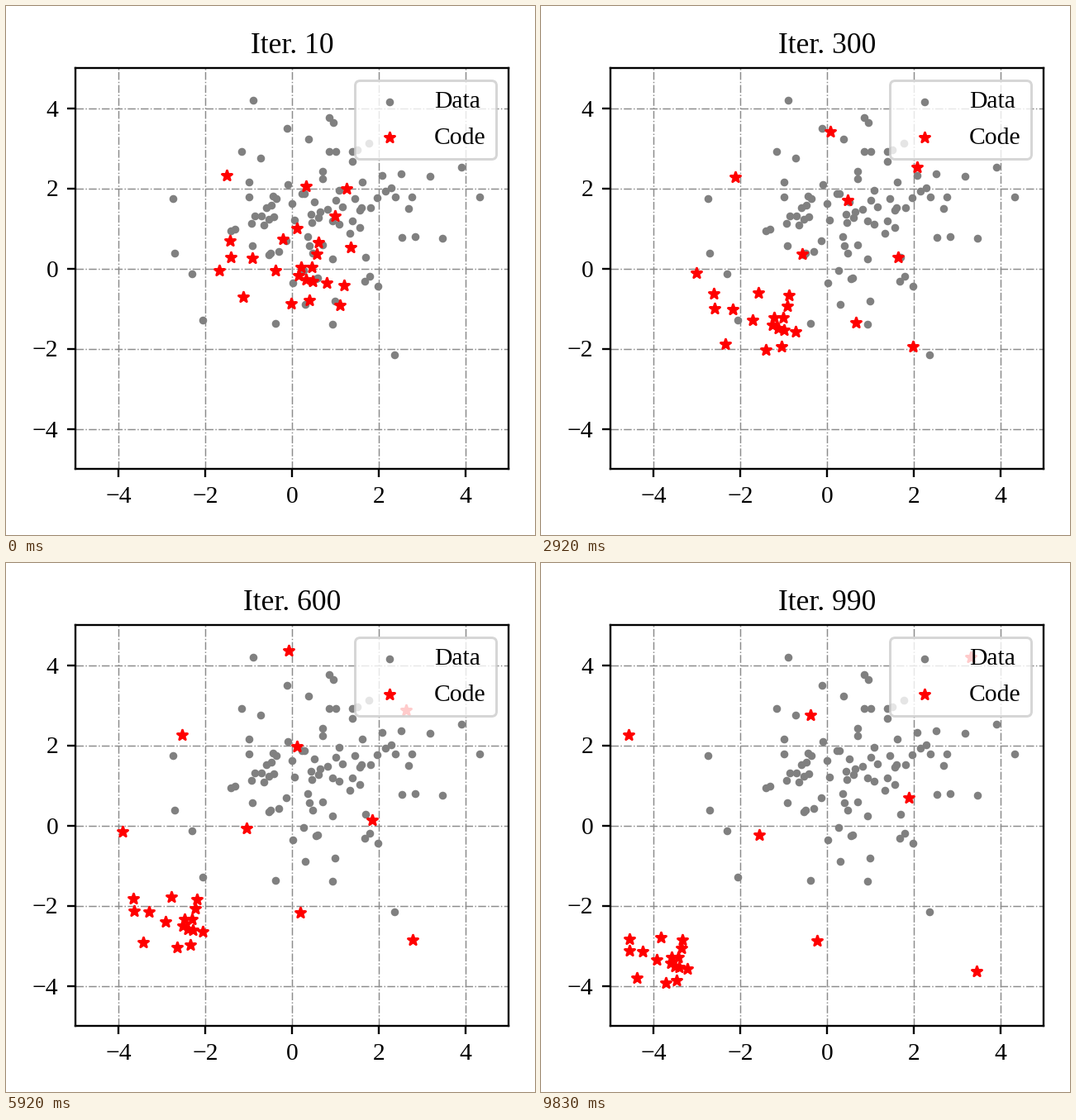
Recreate the animation shown at these times as a matplotlib script. Size 640 by 640 pixels, loop 9990 ms.

```python
import numpy as np
import matplotlib.pyplot as plt
from matplotlib.animation import FuncAnimation

LOOP_MS = 9990
SLOTS = 120          # equal time slots in one loop
STEPS = 99           # distinct iterations shown
TURN = 74            # step at which the wanderers change course

# Axes box on the stage, in pixels from the top left
LEFT, RIGHT, TOP, BOTTOM = 84, 608, 75, 560


def to_data(px):
    """Stage pixels to axes units (-5..5 both ways)."""
    corner, size = np.array([LEFT, BOTTOM]), np.array([RIGHT - LEFT, TOP - BOTTOM])
    return (px - corner) / size * 10 - 5


def ease_out(u, power):
    return 1 - (1 - u) ** power


def cloud(count, center, spread, reach):
    """Seeded normal scatter, cut off at a radius of `reach` deviations."""
    z = np.random.default_rng(8).normal(size=(4 * count, 2))
    z = z[np.hypot(z[:, 0], z[:, 1]) < reach][:count]
    return center + z * spread


# Data: a dense cloud and the dots around its rim
rim = np.array([
    (299, 114), (391, 135), (340, 148), (513, 206), (551, 195), (573, 231), (528, 281),
    (202, 233), (204, 299), (225, 324), (238, 380), (326, 384), (395, 385), (470, 422),
])
dots = to_data(np.vstack([rim, cloud(80, (380, 250), (63, 55), 2.1)]))

# Wanderers: start, turning point, end
wander = np.array([
    [(267, 205), (208, 208), (106, 208)],
    [(363, 218), (340, 97), (356, 38)],
    [(412, 221), (490, 174), (520, 114)],
    [(398, 254), (348, 219), (326, 184)],
    [(417, 292), (445, 313), (445, 284)],
    [(352, 269), (286, 325), (264, 329)],
    [(258, 320), (131, 325), (70, 351)],
])

# Swarm: start points; each ends at the same offset, drawn closer together
swarm = np.array([
    (271, 284), (335, 282), (272, 304), (298, 305), (378, 286), (287, 352),
    (376, 300), (326, 320), (357, 316), (370, 316), (354, 326), (363, 331),
    (371, 333), (388, 335), (345, 360), (367, 356),
])
swarm_end = (150, 480) + (swarm - (343, 320)) * (0.6, 0.7)

# Two stars leave the swarm for the lower right
start = np.vstack([swarm, [(404, 362), (409, 338)]])
end = np.vstack([swarm_end, [(527, 494), (334, 457)]])


def places(k):
    last = STEPS - 1
    direct = start + (end - start) * ease_out(k / last, 1.35)
    a, b, c = wander.swapaxes(0, 1)
    if k < TURN:
        roam = a + (b - a) * ease_out(k / TURN, 1.6)
    else:
        roam = b + (c - b) * (k - TURN) / (last - TURN)
    return to_data(np.vstack([roam, direct]))


plt.rcParams["font.family"] = "Liberation Serif"
fig = plt.figure(figsize=(3, 3), dpi=640 / 3, facecolor="white")
ax = fig.add_axes([LEFT / 640, 1 - BOTTOM / 640,
                   (RIGHT - LEFT) / 640, (BOTTOM - TOP) / 640])
ax.set(xlim=(-5, 5), ylim=(-5, 5),
       xticks=range(-4, 5, 2), yticks=range(-4, 5, 2))
ax.set_axisbelow(True)
ax.grid(color="#8c8c8c", linestyle="-.", linewidth=0.5)

ax.scatter(*dots.T, s=5, color="gray", label="Data")
code = ax.scatter(*places(0).T, s=18, marker="*", color="red", label="Code")
ax.legend(loc="upper right", labelspacing=0.56, borderpad=0.43)
title = ax.set_title("Iter. 10")


def update(slot):
    # Every sixth slot repeats the picture before it
    k = min(slot - (slot + 3) // 6, STEPS - 1)
    code.set_offsets(places(k))
    title.set_text(f"Iter. {10 * (k + 1)}")
    return code, title


anim = FuncAnimation(fig, update, frames=SLOTS, interval=LOOP_MS / SLOTS,
                     repeat=True, repeat_delay=0)
plt.show()
```
